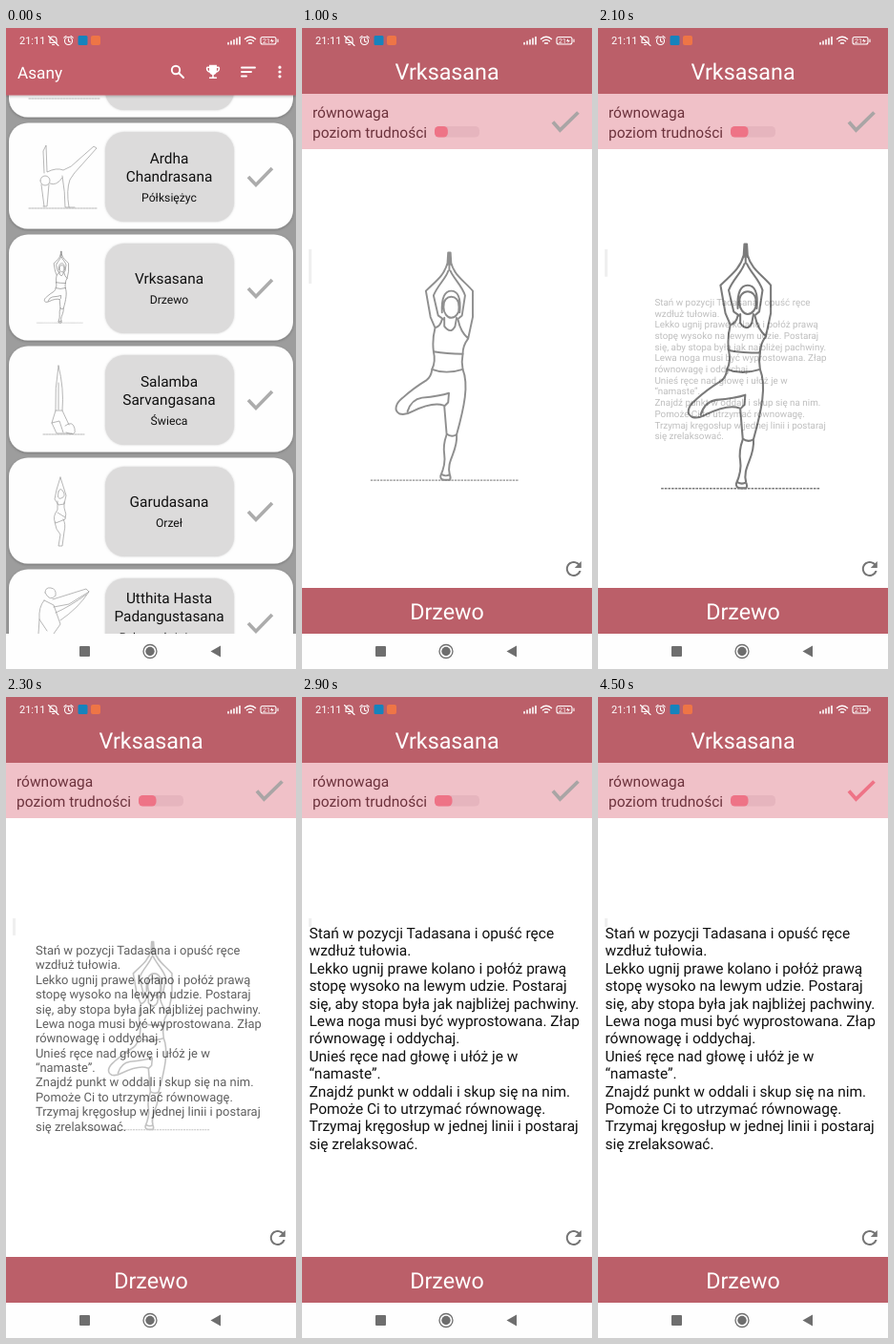
Write an HTML page that moves like this. It is 304 px wide and 672 px high and loops after 5000 ms.

```html
<!DOCTYPE html>
<html lang="pl">
<head>
<meta charset="utf-8">
<title>Asany</title>
<style>
  html, body { margin: 0; width: 100%; height: 100%; overflow: hidden; background: #fff; }
  svg { display: block; width: 304px; height: 672px; font-family: Roboto, sans-serif; text-rendering: geometricPrecision; }
  .line { fill: none; stroke-linecap: round; stroke-linejoin: round; }
  .mid { text-anchor: middle; }
  .thumb { stroke: #999; stroke-width: .7; }
</style>
</head>
<body>
<svg viewBox="0 0 304 672">
  <defs>
    <filter id="shadow" x="-10%" y="-10%" width="120%" height="130%">
      <feDropShadow dx="0" dy="1" stdDeviation="1.8" flood-opacity=".28"/>
    </filter>
    <filter id="soft" x="-10%" y="-10%" width="120%" height="120%">
      <feDropShadow dx="0" dy="0" stdDeviation="1.2" flood-color="#aaa" flood-opacity=".6"/>
    </filter>
    <g id="tree" class="line">
      <path d="M153 222L154 206H157L158 222M155.5 207V229
        M153 220C149 236 137 244 125 256L131 290L137 304
        M154 230C151 240 140 249 135 262L141 288L148 293
        M158 220C162 236 176 244 186 256V290L180 318Q170 309 167 294
        M157 230C161 240 172 249 176 262L172 288L166 293
        M146 293Q144 302 137 304Q133 320 135 335M180 318Q173 327 173 338"/>
      <path d="M146 284C145 264 150 256 158 256S171 264 169 284
        M148 277C147 259 169 259 168 277C169 285 163 291 158 291S148 285 148 277
        M149 291L149 302Q157 313 163 302L165 291"/>
      <path d="M135 335Q152 338 173 338M135 335Q138 348 133 358Q151 365 173 358M173 338Q171 348 173 358"/>
      <path d="M133 358Q132 367 126 372Q108 383 95 395C85 403 83 412 91 416Q98 418 107 413Q134 400 148 405
        M101 413Q106 397 120 395Q143 393 155 389L154 401L149 406L152 442
        M173 358C181 378 175 407 165 443Q158 447 152 442"/>
      <path d="M152 443Q147 457 149 469T144 497Q144 502 149 502H156Q158 500 156 495
        C151 477 167 465 165 443M146 495Q151 498 156 495"/>
    </g>
    <path id="ground" d="M53 502.5H245" fill="none" stroke="#4a4a4a" stroke-width="1.6" stroke-dasharray="3 1.2"/>
  </defs>

  <g id="list">
    <rect width="304" height="672" fill="#9d9d9d"/>
    <g id="cards"></g>
    <g class="line thumb">
      <path d="M24 74H98M24 189H95M39 426H82" stroke-dasharray="2 1"/>
      <path d="M40 152L39 129L42 123L43 151Q53 146 60 149Q69 146 75 139L92 124L95 126L78 145Q71 152 67 159Q63 170 66 188H72
        M59 155Q62 172 62 188H66M36 160A5 5 0 1 1 46 160A5 5 0 1 1 36 160M46 163Q53 166 59 157M37 164L40 187M45 164L43 187H39"/>
      <path d="M55 354Q51 378 52 401L48 414L53 425H69M55 354Q61 378 59 401L66 416M55 372V400M52 401H59M48 414L56 412L60 424M62 417Q70 411 72 420T63 424"/>
      <path d="M57 471L53 484L51 494L55 500L61 499L63 490L57 471M55 486Q57 481 60 486T58 493T55 486M54 496V505Q48 513 52 519L62 515Q64 510 61 503V497
        M51 518Q52 526 57 531L55 543H59L61 528Q63 520 60 515M54 508L62 513"/>
      <path d="M41 592Q41 586 47 587T52 595Q46 602 41 592M49 599L84 588L87 591L66 604L50 607M40 600Q34 607 35 620L43 632M40 600L50 605L57 625L50 635
        M52 613Q66 607 84 594M57 621Q76 608 87 591M35 620L34 635"/>
    </g>
    <g transform="translate(18.5 182) scale(.253)">
      <use href="#tree" stroke="#8c8c8c" stroke-width="2.8"/><use href="#ground" opacity=".7"/>
    </g>
    <rect width="304" height="70.5" fill="#c45f6b" filter="url(#shadow)"/>
    <text x="12" y="53" font-size="17.2" fill="#fff">Asany</text>
    <g class="line" stroke="#fff" stroke-width="1.9">
      <circle cx="178" cy="44" r="4.2"/><path d="M181.5 47.5L186 52M247 41.5H261M247 46H257M247 50.5H252"/>
    </g>
    <path transform="translate(207.5 36.5) scale(.79)" fill="#fff" d="M19 5h-2V3H7v2H5c-1.1 0-2 .9-2 2v1c0 2.55 1.92 4.63 4.39 4.94.63 1.5 1.98 2.63 3.61 2.96V19H7v2h10v-2h-4v-3.1c1.63-.33 2.98-1.46 3.61-2.96C19.08 12.63 21 10.55 21 8V7c0-1.1-.9-2-2-2zM5 8V7h2v3.82C5.84 10.4 5 9.3 5 8zm14 0c0 1.3-.84 2.4-2 2.82V7h2v1z"/>
    <path d="M287 41.2v.01M287 46v.01M287 50.8v.01" class="line" stroke="#fff" stroke-width="3.2"/>
  </g>

  <g id="detail">
    <rect width="304" height="672" fill="#fff"/>
    <rect width="304" height="69" fill="#bb5f69"/>
    <rect y="69" width="304" height="58" fill="#f0c1c8"/>
    <rect y="587" width="304" height="48" fill="#bb5f69"/>
    <g class="mid" fill="#fff" font-size="23.3">
      <text x="152" y="54">Vrksasana</text><text x="152" y="620">Drzewo</text>
    </g>
    <g font-size="15.5" fill="#6d333d">
      <text x="11" y="94">równowaga</text><text x="11" y="115">poziom trudności</text>
    </g>
    <rect x="139" y="103" width="47" height="11.5" rx="4.5" fill="#e6b5be"/>
    <rect id="level" x="139" y="103" height="11.5" rx="4.5" fill="#ee7386"/>
    <path id="check" class="line" d="M263 98.5L270.5 107L289.5 88.5" stroke-width="3.8" style="stroke-linecap:butt;stroke-linejoin:miter"/>
    <rect id="handle" x="7" y="232" width="3" fill="#efefef"/>
    <path transform="translate(272.8 555)" fill="#757575" d="M17.65 6.35C16.2 4.9 14.21 4 12 4c-4.42 0-7.99 3.58-7.99 8s3.57 8 7.99 8c3.73 0 6.84-2.55 7.73-6h-2.08c-.82 2.33-3.04 4-5.65 4-3.31 0-6-2.69-6-6s2.69-6 6-6c1.66 0 3.14.69 4.22 1.78L13 11h7V4l-2.35 2.35z"/>
    <g id="pose"><use href="#tree" stroke="#4a4a4a" stroke-width="2.4"/><use href="#ground"/></g>
    <g id="guide" font-size="15.5" fill="#111"></g>
  </g>

  <g id="status" fill="#fff">
    <text x="14" y="17" font-size="11">21:11</text>
    <g class="line" stroke="#fff" stroke-width="1.1">
      <path d="M46 15.5H53V12Q53 9 49.5 9T46 12V15.5M48.5 17.5H50.5M44.5 8.5L55 18.5"/>
      <circle cx="65.5" cy="13.5" r="4"/><path d="M65.5 11V13.7L67.3 14.7M60.8 10.2L63 8.3M70.2 10.2L68 8.3"/>
      <path d="M233 17V15.5M236 17V14M239 17V12.5M242 17V11M245 17V9.5" stroke-width="1.6"/>
      <path d="M250.5 11.5Q256 7 261.5 11.5M252.5 13.8Q256 11 259.5 13.8M254.5 16H257.5" stroke-width="1.4"/>
      <rect x="267" y="9.5" width="16" height="7.5" rx="2"/><path d="M285 12V14.5"/>
    </g>
    <text x="269" y="16" font-size="7">21</text><path d="M279 11L277 14H279L278 16L281 13H279Z"/>
    <rect x="75.5" y="8" width="10" height="10" rx="1.5" fill="#1683bd"/>
    <rect x="89" y="8" width="10" height="10" rx="2" fill="#ee7546"/>
  </g>
  <g fill="#6e6e6e">
    <rect y="635" width="304" height="37" fill="#fefefe"/>
    <rect x="77" y="648" width="11" height="11" rx="1"/>
    <circle cx="151" cy="653.5" r="7" fill="none" stroke="#6e6e6e" stroke-width="1.3"/><circle cx="151" cy="653.5" r="4.7"/>
    <path d="M214.5 653.5L225 647.5V659.5Z"/>
  </g>
</svg>
<script>
const LOOP = 5000, STEP = 100;
const $ = id => document.getElementById(id);

const asanas = [
  [[], []],
  [['Ardha', 'Chandrasana'], ['Półksiężyc']],
  [['Vrksasana'], ['Drzewo']],
  [['Salamba', 'Sarvangasana'], ['Świeca']],
  [['Garudasana'], ['Orzeł']],
  [['Utthita Hasta', 'Padangustasana'], ['Palec u dużej stopy', 'w dłoni']],
];
const guideLines = [
  'Stań w pozycji Tadasana i opuść ręce', 'wzdłuż tułowia.',
  'Lekko ugnij prawe kolano i połóż prawą', 'stopę wysoko na lewym udzie. Postaraj',
  'się, aby stopa była jak najbliżej pachwiny.', 'Lewa noga musi być wyprostowana. Złap',
  'równowagę i oddychaj.', 'Unieś ręce nad głowę i ułóż je w', '“namaste”.',
  'Znajdź punkt w oddali i skup się na nim.', 'Pomoże Ci to utrzymać równowagę.',
  'Trzymaj kręgosłup w jednej linii i postaraj', 'się zrelaksować.',
];

const textLines = (lines, x, y, pitch) => lines.map((line, i) =>
  `<text x="${x}" y="${y + pitch * i}">${line}</text>`).join('');

// Title and translation are centred together in the grey box.
function card([names, translation], i) {
  const first = 67 - 9 * names.length - 7 * translation.length;
  return `<g transform="translate(0 ${117 * i - 17})">
    <rect x="3" y="-.5" width="298" height="111" rx="20" fill="#fefefe" filter="url(#shadow)"/>
    <rect x="104" y="9" width="135" height="94" rx="20" fill="#dcdbdb" filter="url(#soft)"/>
    <g class="mid" fill="#111">
      <g font-size="15.4">${textLines(names, 171, first, 19)}</g>
      <g font-size="12.2">${textLines(translation, 171, first + 2 + 19 * names.length, 14)}</g>
    </g>
    <path d="M254 56L262 64.5L279 47" fill="none" stroke="#acacac" stroke-width="3.6"/></g>`;
}
$('cards').innerHTML = asanas.map(card).join('');
$('guide').innerHTML = textLines(guideLines, 7.5, 253, 18.4);

const progress = (t, from, to) => Math.min(1, Math.max(0, (t - from) / (to - from)));
const ease = p => (1 - Math.cos(Math.PI * p)) / 2;
const mix = (a, b, p) => a.map((v, i) => v + (b[i] - v) * p);

// Hidden views sit at half size and grow as they fade in.
function reveal(el, shown) {
  const scale = .5 + .5 * shown;
  el.setAttribute('opacity', shown);
  el.setAttribute('transform', `translate(150 357) scale(${scale}) translate(-150 -357)`);
}

function draw(t) {
  const swap = ease(progress(t, 1834, 2597));
  $('detail').setAttribute('opacity', progress(t, 150, 450));
  reveal($('pose'), ease(progress(t, 600, 1300)) * (1 - swap));
  reveal($('guide'), swap);
  $('level').setAttribute('width', 18.5 * ease(progress(t, 600, 1200)));
  $('handle').setAttribute('height', 36 - 27 * swap);
  $('check').setAttribute('stroke', `rgb(${mix([169, 165, 165], [238, 115, 134], progress(t, 3150, 3450))})`);
}

function frame() {
  draw(Math.floor(performance.now() % LOOP / STEP) * STEP);
  requestAnimationFrame(frame);
}
frame();
</script>
</body>
</html>
```
